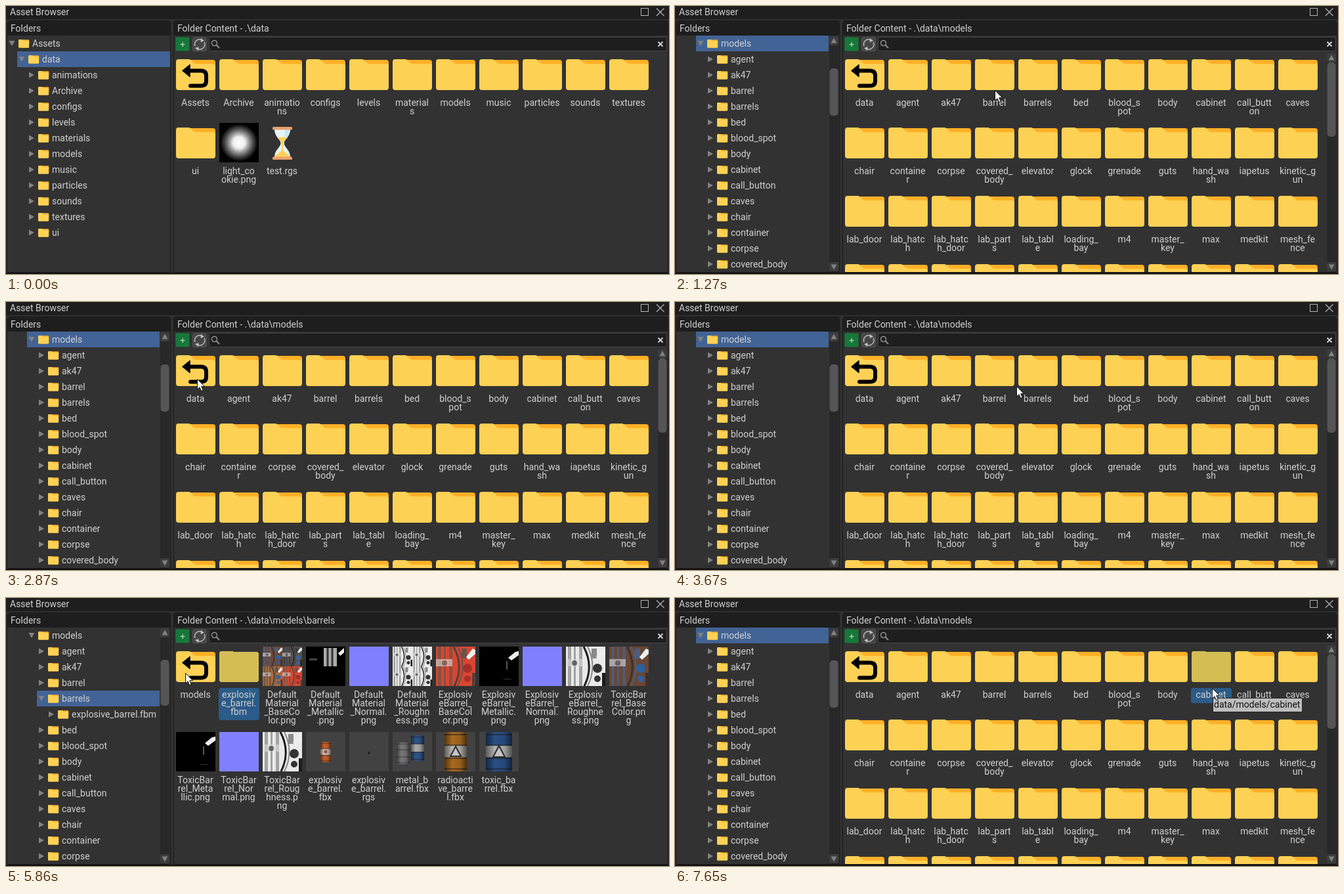
These frames come from a looping animation (1010x408 px, 8 s). An HTML page:

```html
<!DOCTYPE html>
<html lang="en">
<head>
<meta charset="utf-8">
<title>Asset Browser</title>
<style>
html, body { margin: 0; width: 100%; height: 100%; overflow: hidden; background: #1e1e1e; }
svg { display: block; }
text { font: 14px Roboto, "Liberation Sans", sans-serif; fill: #d0d0d0; }
</style>
</head>
<body>
<script>
const LOOP = 8000, TICK = 66.5;
const NS = 'http://www.w3.org/2000/svg';

function add(parent, tag, attrs = {}, content) {
  const el = document.createElementNS(NS, tag);
  for (const k in attrs) el.setAttribute(k, attrs[k]);
  if (content !== undefined) el.textContent = content;
  parent.appendChild(el);
  return el;
}
const rect = (p, x, y, width, height, fill, more) => add(p, 'rect', { x, y, width, height, fill, ...more });
const disc = (p, cx, cy, r, fill, more) => add(p, 'circle', { cx, cy, r, fill, ...more });
const path = (p, d, fill, more) => add(p, 'path', { d, fill, ...more });
const line = (p, d, stroke, width, more) => path(p, d, 'none', { stroke, 'stroke-width': width, ...more });
const text = (p, x, y, s, more) => add(p, 'text', { x, y, ...more }, s);
const group = (p, x = 0, y = 0, more) => add(p, 'g', { transform: `translate(${x} ${y})`, ...more });
const show = (el, on) => { el.style.display = on ? '' : 'none'; };

const stage = add(document.body, 'svg', { width: '100%', height: '100%', viewBox: '0 0 1010 408' });
const defs = add(stage, 'defs');

function gradient(tag, id, stops) {
  const g = add(defs, tag, { id });
  for (const [offset, color, alpha = 1] of stops)
    add(g, 'stop', { offset, 'stop-color': color, 'stop-opacity': alpha });
}
gradient('radialGradient', 'glow', [[0, '#fff'], [0.3, '#eee'], [0.5, '#999'], [0.72, '#484848'], [0.95, '#000']]);
gradient('linearGradient', 'round', [[0, '#000', 0.5], [0.35, '#000', 0], [0.7, '#000', 0.1], [1, '#000', 0.55]]);

const FOLDER = 'M4 0H19C24 0 25 7 31 7H56Q60 7 60 11V43Q60 47 56 47H4Q0 47 0 43V4Q0 0 4 0Z';
const FOLDER_BACK = 'M18 1H56Q60 1 60 5V20H18Z';
function folder(p) {
  path(p, FOLDER_BACK, '#ffb026');
  path(p, FOLDER, '#fdd154');
}

// ---- window chrome ----
rect(stage, 0, 0, 1010, 408, '#1e1e1e');
rect(stage, 0, 20, 1010, 386, '#303030');
rect(stage, 0, 406, 1010, 2, '#111');
text(stage, 6, 14, 'Asset Browser');
rect(stage, 967.5, 3.5, 11, 11, 'none', { stroke: '#b4b4b4' });
line(stage, 'M991 3.5L1002.5 15M1002.5 3.5L991 15', '#b4b4b4', 1.2);

function panel(x, w, title) {
  rect(stage, x + 0.5, 22.5, w, 383, '#323232', { rx: 3, stroke: '#1a1a1a' });
  rect(stage, x + 1, 23, w - 1, 22, '#1e1e1e', { rx: 3 });
  return text(stage, x + 6, 39, title);
}
panel(1, 249, 'Folders');
const heading = panel(255, 753, '');

rect(stage, 258.5, 47.5, 21, 21, '#17783a', { rx: 2, stroke: '#1d5a32' });
line(stage, 'M265.5 58.5H272.5M269 55V62', '#c8e2cf', 1.2);
rect(stage, 284.5, 47.5, 21, 21, '#464646', { rx: 2, stroke: '#555' });
line(stage, 'M288 61A7.5 7.5 0 0 1 299 52M302 55A7.5 7.5 0 0 1 291 64.5', '#c0c0c0', 1.4);
path(stage, 'M297 49L302 53L296.500 55ZM293 68L288 64L293.500 62Z', '#c0c0c0');
rect(stage, 309.5, 47.5, 697, 21, '#1e1e1e', { rx: 3, stroke: '#464646' });
disc(stage, 317.5, 56.5, 4, 'none', { stroke: '#8c8c8c', 'stroke-width': 1.6 });
line(stage, 'M320.500 59.500L325 64', '#8c8c8c', 2);
line(stage, 'M993.500 54.500L1000.500 61.500M1000.500 54.500L993.500 61.500', '#d0d0d0', 2);

// ---- thumbnails, drawn in a 60 unit square ----
function hourglass(p) {
  path(p, 'M18 10H42C42 21 32.500 25 32.500 31C32.500 37 42 41 42 52H18C18 41 27.500 37 27.500 31C27.500 25 18 21 18 10Z', '#e6f4f8');
  path(p, 'M34 10H42C42 21 32.500 25 32.500 31C32.500 37 42 41 42 52H36C36 41 31 37 31 31C31 25 34 21 34 10Z', '#cbe8f4');
  path(p, 'M22 22H38L32 29V42L41 50V52H19V50L28 42V29Z', '#ffd15c');
  path(p, 'M28.500 31L24 40L20 49L29 41.500ZM31.500 31L36 40L40 49L31 41.500Z', '#e6f4f8');
  rect(p, 15, 6, 30, 4.5, '#e9a16c', { rx: 1.5 });
  rect(p, 15, 51.5, 30, 4.5, '#e9a16c', { rx: 1.5 });
}

function glow(p) {
  rect(p, 0, 0, 60, 60, '#000');
  disc(p, 30, 30, 30, 'url(#glow)');
}

// Unwrapped barrel texture: bands, a curved seam and lids.
function sheet(p, bg, band, seam, lid) {
  rect(p, 0, 0, 60, 60, bg);
  for (const [x, w] of [[3, 5], [12, 3], [20, 5]]) rect(p, x, 0, w, 60, band, { opacity: 0.75 });
  rect(p, 0, 19, 25, 11, '#ddd', { opacity: 0.6 });
  disc(p, 13, 25, 4, seam, { opacity: 0.6 });
  line(p, 'M27 0Q43 30 28 60', seam, 3);
  line(p, 'M33 0Q48 30 33 60', band, 2);
  disc(p, 48, 33, 7, lid);
  disc(p, 48, 49, 5, lid);
  rect(p, 55, 40, 5, 20, seam);
  rect(p, 39, 3, 8, 15, band);
  path(p, 'M46 16L56 3L60 5V11L50 20Z', '#eee');
}
const rough = p => sheet(p, '#eaeaea', '#8a8a8a', '#1c1c1c', '#333');
const redSheet = p => sheet(p, '#d84631', '#6d5348', '#54403a', '#a92e2a');
const blueSheet = p => sheet(p, '#6a4634', '#4a5f82', '#3a3230', '#2f5f9f');
const flat = p => rect(p, 0, 0, 60, 60, '#8080ff');

function quarters(...parts) {
  return p => parts.forEach((draw, i) =>
    draw(add(p, 'g', { transform: `translate(${i % 2 * 30} ${i >> 1} ) translate(0 ${(i >> 1) * 29}) scale(.5)` })));
}
const grey = p => sheet(p, '#55504e', '#3a3c42', '#222', '#3b62a0');
const orange = p => sheet(p, '#a86a3c', '#5a5048', '#33383f', '#3b62a0');

function metal(p) {
  rect(p, 0, 0, 60, 60, '#000');
  path(p, 'M44 17L55 8L60 7V13L49 21Z', '#eee');
  rect(p, 41, 22, 2, 13, '#555');
  rect(p, 37, 49, 12, 1, '#333');
}
function metalMix(p) {
  rect(p, 0, 0, 60, 60, '#000');
  rect(p, 27, 2, 20, 28, '#aaa');
  line(p, 'M33 2V30M40 2V30', '#333', 3);
  path(p, 'M49 10L58 2V9L52 14Z', '#eee');
  rect(p, 5, 18, 12, 3, '#444');
}

function planks(bg, seam, under, lid, rim) {
  return p => {
    rect(p, 0, 0, 60, 60, under);
    rect(p, 0, 0, 60, 33, bg);
    for (const y of [1, 9, 22, 31]) rect(p, 0, y, 60, 2, seam, { opacity: 0.8 });
    for (let i = 0; i < 12; i++) rect(p, i * 5, 11 + i * 7 % 11, 4, 2, seam, { opacity: 0.25 });
    for (const x of [15, 45]) {
      disc(p, x, 47, 13, lid, { stroke: rim, 'stroke-width': 2 });
      line(p, `M${x - 7} 40Q${x} 48 ${x + 5} 42M${x - 5} 53L${x + 7} 49`, rim, 2, { opacity: 0.5 });
    }
  };
}

function drum(p, x, y, w, h, color, band) {
  rect(p, x, y, w, h, color, { rx: w / 9 });
  if (band) rect(p, x, y + h * 0.34, w, h * 0.3, band);
  for (const k of [0.05, 0.32, 0.65, 0.92]) rect(p, x, y + h * k, w, Math.max(1, h / 30), '#222', { opacity: 0.6 });
  rect(p, x, y, w, h, 'url(#round)', { rx: w / 9 });
}
const model = draw => p => { rect(p, 0, 0, 60, 60, '#424242'); draw(p); };
const woodDrum = (x, y, w, h) => model(p => drum(p, x, y, w, h, '#3d3c36'));
const sign = (p, w) => path(p, `M30 ${30 - w}L${30 + w} ${29 + w}H${30 - w}Z`, '#c4c4c4', { stroke: '#2a2a2a', 'stroke-width': 2 });

const redDrum = model(p => {
  drum(p, 22, 15, 16, 31, '#c2602f', '#c9c4bd');
  disc(p, 30, 30, 2.5, '#a5452b');
});
const speck = model(p => rect(p, 29, 30, 2, 4, '#191919'));
const twoDrums = model(p => {
  drum(p, 6, 16, 20, 33, '#777');
  drum(p, 28, 5, 20, 39, '#2f5588', '#aaa');
});
const yellowDrum = model(p => {
  drum(p, 13, 0, 34, 60, '#a9691f', '#b9b6b0');
  sign(p, 8);
});
const blueDrum = model(p => {
  drum(p, 10, 0, 40, 60, '#294f86', '#b4b4b4');
  sign(p, 9);
});

// ---- tree ----
function treeRow(p, i, level, name, open, selected, right) {
  const y = 57 + 24 * i, x = 9 + 15 * level;
  if (selected) rect(p, x - 7, y - 12, right - x + 7, 24, '#426395');
  path(p, open ? `M${x - 4.5} ${y - 4}h9l-4.500 8z` : `M${x - 4} ${y - 4.5}v9l8 -4.500z`, '#828282');
  folder(add(p, 'g', { transform: `translate(${x + 10} ${y - 6}) scale(.27)` }));
  text(p, x + 31, y + 5, name);
}

function scrollbar(p, x, top, from, to) {
  const g = group(p);
  rect(g, x, top, 14, 405 - top, '#282828');
  for (const [y, d] of [[top, -1], [390, 1]]) {
    rect(g, x, y, 14, 14, '#3c3c3c', { rx: 2 });
    path(g, `M${x + 2.5} ${y + 7 - 3.5 * d}h9l-4.500 ${8 * d}z`, '#828282');
  }
  rect(g, x + 0.5, from, 13, to - from, '#555', { rx: 5 });
  return g;
}

// ---- grid ----
// A string is a folder ('<' marks the way back), an array is [label, thumbnail, load tick].
function cell(p, item, x, y) {
  const isFile = Array.isArray(item);
  const back = !isFile && item[0] === '<';
  const lines = (isFile ? item[0] : item.replace('<', '')).split('|');
  const plate = rect(p, x - 1, y + 63, 62, 10 + 13 * lines.length, '#2b5b88', { rx: 4 });
  const marks = [plate];
  const out = { marks, lines: lines.length };
  if (isFile) {
    const [, draw, load = 0] = item;
    out.wait = group(p, x, y);
    hourglass(out.wait);
    out.thumb = add(p, 'svg', { x, y, width: 60, height: 60 });
    draw(out.thumb);
    out.load = load;
  } else {
    const g = group(p, x, y + 7);
    folder(g);
    marks.push(path(g, FOLDER + FOLDER_BACK, '#d4be54'));
    if (back) {
      line(g, 'M16 17.500H38Q46 17.500 46 25V33Q46 40.500 38 40.500H22', '#000', 6, { 'stroke-linecap': 'round' });
      path(g, 'M10 17.500L21 8.500V26.500Z', '#000', { stroke: '#000', 'stroke-width': 1.500, 'stroke-linejoin': 'round' });
    }
  }
  lines.forEach((s, i) => text(p, x + 29.5, y + 78 + 13 * i, s, { 'text-anchor': 'middle' }));
  return out;
}

add(add(defs, 'clipPath', { id: 'body' }), 'rect', { x: 2, y: 45, width: 1005, height: 360 });

function scene(location, rows, items, { thumb, barUntil = 0, pick = 0 }) {
  const g = add(stage, 'g', { 'clip-path': 'url(#body)' });
  rows.forEach(([level, name, open], i) => treeRow(g, i, level, name, open, i === pick, thumb ? 234 : 250));
  if (thumb) scrollbar(g, 235, 46, ...thumb);
  const cells = [];
  for (let i = 0, y = 74; i < items.length; i += 11) {
    const row = items.slice(i, i + 11).map((item, c) => cell(g, item, 259 + 66 * c, y));
    cells.push(...row);
    y += 78 + 13 * Math.max(2, ...row.map(c => c.lines));
  }
  const bar = barUntil ? scrollbar(g, 993, 72, 86, 199) : null;
  return { g, location, cells, bar, barUntil };
}

const words = s => s.split(' ');
const at = (level, s) => words(s).map(name => [level, name]);
const kids = 'agent ak47 barrel barrels bed blood_spot body cabinet call_button caves chair container corpse covered_body';
const modelRows = [[2, 'models', true], ...at(3, kids)];
const opened = (i, extra = []) => {
  const rows = modelRows.map(r => [...r]);
  rows[i][2] = true;
  rows.splice(i + 1, 0, ...extra);
  return rows.slice(0, 15);
};

const root = scene('.\\data',
  [[0, 'Assets', true], [1, 'data', true],
    ...at(2, 'animations Archive configs levels materials models music particles sounds textures ui')],
  [...words('<Assets Archive animatio|ns configs levels material|s models music particles sounds textures ui'),
    ['light_co|okie.png', glow], ['test.rgs', hourglass, Infinity]],
  { pick: 1 });

const models = scene('.\\data\\models', modelRows,
  words('<data agent ak47 barrel barrels bed blood_s|pot body cabinet call_butt|on caves ' +
    'chair containe|r corpse covered_|body elevator glock grenade guts hand_wa|sh iapetus kinetic_g|un ' +
    'lab_door lab_hatc|h lab_hatc|h_door lab_part|s lab_tabl|e loading_|bay m4 master_|key max medkit mesh_fe|nce ' +
    'a b c d e f g h i j k'),
  { thumb: [95, 167], barUntil: Infinity });

const barrel = scene('.\\data\\models\\barrel', opened(3), [
  '<models',
  ['barrel.FB|X', woodDrum(14, -6, 33, 72), 27],
  ['barrel.jp|g', planks('#e2d3bf', '#74492a', '#0b0907', '#b48355', '#5a3a20'), 27],
  ['barrel.rg|s', woodDrum(22, 17, 16, 29), 27],
  ['barrel_n|ormal.jp|g', planks('#8478f8', '#6aa6fa', '#7f80fb', '#b070e8', '#d45fd8'), 27]
], { thumb: [95, 167], barUntil: 27, pick: 3 });

const barrels = scene('.\\data\\models\\barrels', opened(4, [[4, 'explosive_barrel.fbm']]), [
  '<models', 'explosiv|e_barrel.|fbm',
  ['Default|Material|_BaseCo|lor.png', quarters(blueSheet, grey, orange, redSheet), 66],
  ['Default|Material|_Metallic|.png', metalMix, 66],
  ['Default|Material|_Normal.|png', flat, 66],
  ['Default|Material|_Roughn|ess.png', quarters(rough, rough, rough, rough), 66],
  ['Explosiv|eBarrel_|BaseCol|or.png', redSheet, 66],
  ['Explosiv|eBarrel_|Metallic.|png', metal, 66],
  ['Explosiv|eBarrel_|Normal.|png', flat, 66],
  ['Explosiv|eBarrel_|Roughne|ss.png', rough, 67],
  ['ToxicBar|rel_Base|Color.pn|g', blueSheet, 67],
  ['ToxicBar|rel_Meta|llic.png', metal, 67],
  ['ToxicBar|rel_Nor|mal.png', flat, 67],
  ['ToxicBar|rel_Roug|hness.p|ng', rough, 67],
  ['explosiv|e_barrel.|fbx', redDrum, 74],
  ['explosiv|e_barrel.|rgs', speck, 75],
  ['metal_b|arrel.fbx', twoDrums, 76],
  ['radioacti|ve_barre|l.fbx', yellowDrum, 77],
  ['toxic_ba|rrel.fbx', blueDrum, 78]
], { thumb: [94, 164], barUntil: 66, pick: 4 });

const scenes = [root, models, barrel, barrels];

const tip = group(stage);
rect(tip, 819.5, 152.5, 136, 21, '#bebebe', { stroke: '#222' });
text(tip, 821, 167, 'data/models/cabinet', { style: 'fill:#111' });

const cursor = group(stage);
path(cursor, 'M.500 .500V16L4 12.700L6.600 18.500L9.200 17.400L6.700 11.700H11.500Z', '#fff', { stroke: '#111', 'stroke-width': 1 });

// ---- timeline, in ticks ----
const visits = [[0, root], [12, models], [25, barrel], [41, models], [64, barrels], [97, models]];
const picks = [[0, -1], [9, 6], [12, -1], [22, 3], [25, -1], [39, 0], [41, -1],
  [61, 4], [64, -1], [80, 1], [93, 0], [97, -1], [110, 8]];
// [tick, x, y, linear]
const moves = [[1, 883, 370], [8, 690, 112], [12, 690, 112], [19, 487, 128], [31, 487, 128],
  [33, 440, 128], [35, 325, 124, 1], [37, 285, 117, 1], [42, 285, 117], [52, 508, 131], [53, 508, 131],
  [55, 520, 128, 1], [60, 562, 127, 1], [73, 562, 127], [79, 352, 102], [83, 352, 102],
  [88, 273, 114], [100, 273, 114], [108, 818, 137]];

const latest = (list, n) => list.filter(e => e[0] <= n).pop();

function pointer(n) {
  const i = moves.findIndex(m => m[0] > n);
  if (i < 0) return moves[moves.length - 1].slice(1, 3);
  const a = moves[Math.max(0, i - 1)], b = moves[i];
  const u = Math.max(0, (n - a[0]) / (b[0] - a[0] || 1));
  const k = b[3] ? u : u * u * (3 - 2 * u);
  return [1, 2].map(j => Math.round(a[j] + (b[j] - a[j]) * k));
}

function render(ms) {
  const n = Math.floor(ms / TICK);
  const now = latest(visits, n)[1];
  const picked = latest(picks, n)[1];
  heading.textContent = 'Folder Content - ' + now.location;
  for (const s of scenes) show(s.g, s === now);
  if (now.bar) show(now.bar, n < now.barUntil);
  now.cells.forEach((c, i) => {
    for (const m of c.marks) show(m, i === picked);
    if (c.thumb) {
      show(c.wait, n < c.load);
      show(c.thumb, n >= c.load);
    }
  });
  tip.setAttribute('opacity', Math.min(1, Math.max(0, (n - 111) / 4)));
  show(cursor, n >= 1);
  cursor.setAttribute('transform', `translate(${pointer(n)})`);
}

const start = performance.now();
function frame() {
  render((performance.now() - start) % LOOP);
  requestAnimationFrame(frame);
}
frame();
</script>
</body>
</html>
```
